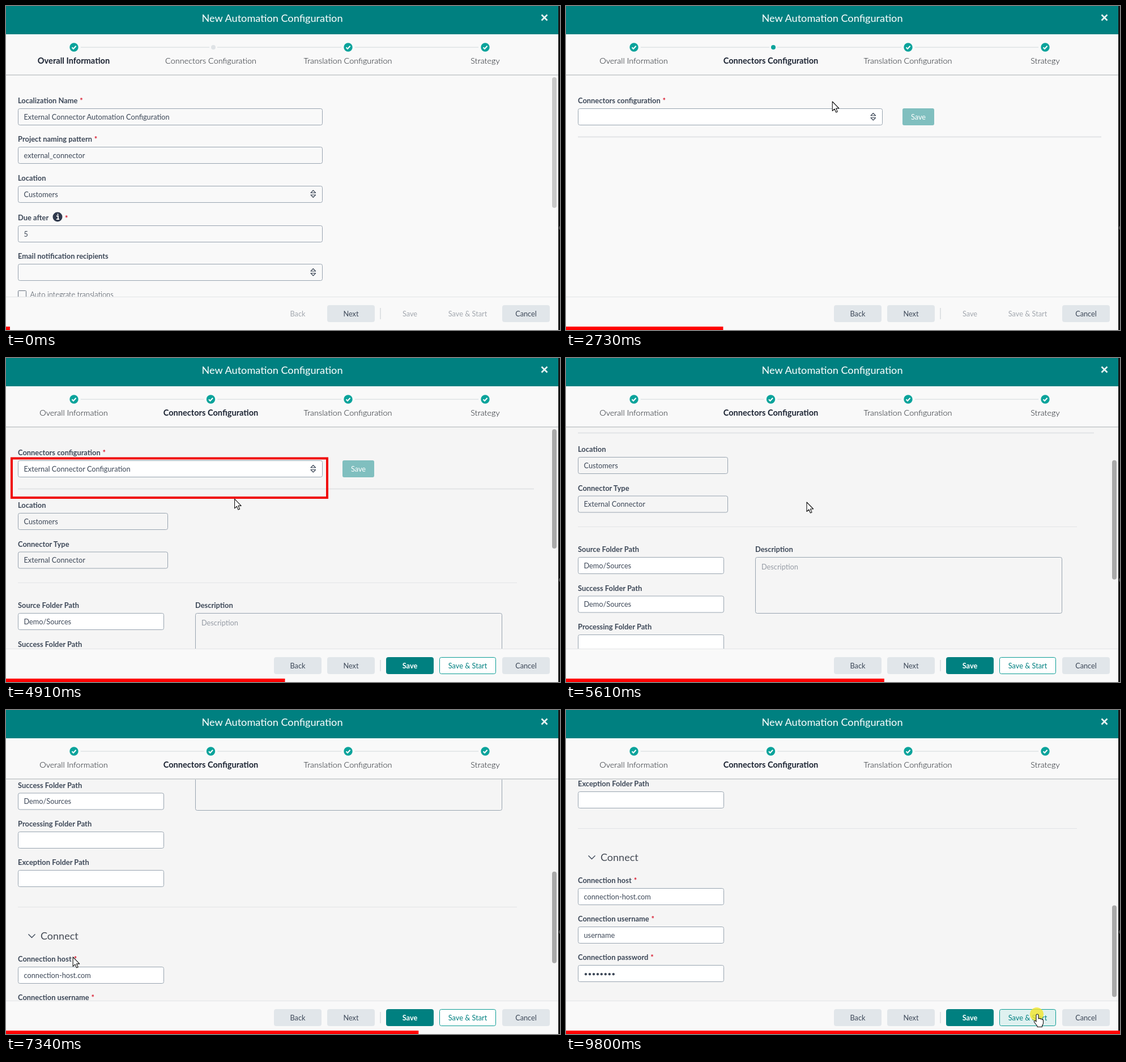
These frames come from a looping animation (978 by 573 pixels, 9870 ms). An HTML page:

```html
<!DOCTYPE html>
<html lang="en">
<head>
<meta charset="utf-8">
<title>New Automation Configuration</title>
<style>
  html, body { margin: 0; width: 100%; height: 100%; overflow: hidden; background: #f9f9f9; }
  svg { display: block; }
  text { font: 12.75px Lato, "Open Sans", sans-serif; fill: #3d4858; white-space: pre; }
  .title { font-size: 18.15px; fill: #fff; }
  .step { font-size: 14.45px; font-weight: 300; fill: #10151c; }
  .step.on { font-size: 14.6px; font-weight: 700; fill: #1c2433; }
  .label { font-size: 12.9px; font-weight: 700; }
  .star { fill: #d9182d; }
  .light { font-size: 12.9px; font-weight: 300; fill: #28323f; }
  .head { font-size: 18px; fill: #454b55; }
  .dots { font-size: 12px; }
  .hint { fill: #969ca5; }
  .box { fill: none; stroke: #98a4b0; }
  .white { fill: #fff; }
  .rule { stroke: #e2e4e6; }
  .icon { fill: none; stroke: #3d4858; stroke-width: 1.4; }
  .btn rect { fill: #e1e6ea; stroke: #e1e6ea; }
  .btn.off rect { fill: none; stroke: none; }
  .btn.off text { fill: #a3a8af; }
  .btn.main rect { fill: #008080; stroke: #008080; }
  .btn.main text { fill: #fff; font-weight: 700; }
  .btn.line rect { fill: #fff; stroke: #0a9c94; }
  .btn.line text { fill: #008080; }
  .btn.line.hover rect { fill: #dff1f0; }
</style>
</head>
<body>
<script>
const FRAME = 70, COUNT = 141, W = 978, H = 573;

const PAGE_AT = 2310, FOCUS_AT = 3080, MARK_AT = 3010, OPEN_AT = 3290,
      PICK_AT = 4340, LOAD_AT = 4550, UNMARK_AT = 5330, EXPAND_AT = 6930, HOVER_AT = 9520;

// Markup helpers; text is placed by its vertical middle.
const text = (x, y, s, cls = '', size = 13, anchor = 'start') =>
  `<text x="${x}" y="${y + size * .36}" class="${cls}" text-anchor="${anchor}">${s}</text>`;
const label = (x, y, s, need) =>
  text(x, y, s + (need ? '<tspan class="star" dx="4">*</tspan>' : ''), 'label');
const box = (x, y, w, h = 29, cls = '', id = '') =>
  `<rect id="${id}" class="box ${cls}" x="${x + .5}" y="${y + .5}" width="${w}" height="${h}" rx="3"/>`;
const field = (y, name, value, w, { need, cls = '', style = '' } = {}) =>
  label(21, y - 13.5, name, need) + box(21, y, w, 29, cls) + text(31.5, y + 15, value, style);
const rule = (y, right, width = 1, color = '#e2e4e6') =>
  `<path d="M21 ${y}H${right}" stroke="${color}" stroke-width="${width}"/>`;
const sorter = y => `<path class="icon" stroke-linejoin="round" style="stroke-width:1.15"
  d="M538 ${y - 2}L542.300 ${y - 6.5}L546.600 ${y - 2}ZM538 ${y + 1.500}H546.600L542.300 ${y + 6}Z"/>`;
const button = (id, x, w, s, cls = '') =>
  `<g id="${id}" class="btn ${cls}"><rect x="${x + .5}" y="529.5" width="${w - 1}" height="29" rx="3"/>` +
  text(x + w / 2, 544, s, '', 13, 'middle') + '</g>';
const check = x => `<g transform="translate(${x} 73)">
  <circle r="12" fill="#f9f9f9"/><circle r="7.7" fill="#0aa39b"/>
  <path d="M-3.500 .2L-1 2.700L3.600-2.300" fill="none" stroke="#fff" stroke-width="2"/></g>`;

const steps = [[119.5, 'Overall Information'], [361.5, 'Connectors Configuration'],
               [603.5, 'Translation Configuration'], [846, 'Strategy']];

const overall =
  field(181, 'Localization Name', 'External Connector Automation Configuration', 537, { need: true }) +
  field(249, 'Project naming pattern', 'external_connector', 537, { need: true }) +
  field(318, 'Location', 'Customers', 537) + sorter(332.5) +
  field(388, 'Due after', '5', 537) +
  `<circle cx="91" cy="373" r="8.5" fill="#2f394c"/>
   <path d="M89 371.500H92V377M89 377.200H94M90.500 368.500H92.500" fill="none" stroke="#fff" stroke-width="1.8"/>` +
  text(104, 375, '*', 'label star') +
  field(456, 'Email notification recipients', '', 537) + sorter(471) +
  '<rect x="21.5" y="503.5" width="14" height="14" rx="1" class="box" style="stroke:#66717e"/>' +
  text(42.5, 510, 'Auto integrate translations', 'light');

const white = { cls: 'white' }, needed = { cls: 'white', need: true };
const details =
  field(274, 'Location', 'Customers', 264) +
  field(342.5, 'Connector Type', 'External Connector', 264) +
  rule(397.5, 902) +
  field(451, 'Source Folder Path', 'Demo/Sources', 257, white) +
  label(334, 437.5, 'Description') + box(334, 451, 541, 99) + text(345, 468, 'Description', 'hint') +
  field(519.5, 'Success Folder Path', 'Demo/Sources', 257, white) +
  field(588, 'Processing Folder Path', '', 257, white) +
  field(656, 'Exception Folder Path', '', 257, white) +
  rule(721.5, 902) +
  '<path id="chevron" class="icon"/>' +
  text(61, 773, 'Connect', 'head', 18) +
  '<g id="account">' +
  field(827, 'Connection host', 'connection-host.com', 257, needed) +
  field(895, 'Connection username', 'username', 257, needed) +
  field(963, 'Connection password', '••••••••', 257, { ...needed, style: 'dots' }) +
  '</g>';

document.body.innerHTML = `<svg width="${W}" height="${H}" viewBox="0 0 ${W} ${H}">
  <defs>
    <clipPath id="view"><path d="M0 123H975V514H0Z"/></clipPath>
    <filter id="shade" x="-5%" y="-30%" width="110%" height="180%">
      <feDropShadow dx="0" dy="2" stdDeviation="1.8" flood-opacity=".35"/></filter>
  </defs>
  <rect width="${W}" height="${H}" fill="#f9f9f9"/>
  <rect width="975" height="50" fill="#008080"/>
  ${text(470, 21.5, 'New Automation Configuration', 'title', 18.2, 'middle')}
  <path d="M945.500 15.500L955.500 25.500M955.500 15.500L945.500 25.500" stroke="#e6f2f2" stroke-width="2.800"/>
  <path d="M120 73H846" stroke="#dfe3e6" stroke-width="1.500"/>
  ${check(120)}${check(604)}${check(846)}
  <g id="dot"><circle cx="366" cy="73" r="7" fill="#f9f9f9"/><circle id="dotFill" cx="366" cy="73" r="4"/></g>
  <g id="tick">${check(361.5)}</g>
  ${steps.map(([x, s]) => text(x, 97, s, 'step', 14.6, 'middle')).join('')}
  <g clip-path="url(#view)">
    <rect id="tint" y="123" width="975" height="391" fill="#f5f5f5"/>
    <g id="overall">${overall}</g>
    <g id="connectors">
      ${label(21, 167.5, 'Connectors configuration', true)}
      ${box(21, 181, 537, 29, 'white', 'picker')}${sorter(196)}
      <g id="picked">${text(31.5, 196, 'External Connector Configuration')}</g>
      <path id="caret" d="M32.500 188V204" stroke="#222"/>
      <rect x="594" y="181" width="56" height="30" rx="3" fill="#80bfbf"/>
      ${text(622, 196, '<tspan fill="#fff">Save</tspan>', '', 13, 'middle')}
      <g id="ruleWide">${rule(231.5, 945, 2)}</g><g id="ruleSlim">${rule(231.5, 932, 2)}</g>
      <g id="details">${details}</g>
      <g id="list"><rect x="21" y="211" width="537" height="30" fill="#e3f1f0" filter="url(#shade)"/>
        ${text(33, 225.5, 'External Connector Configuration')}</g>
    </g>
    <rect id="thumb" x="964" width="8" rx="4"/>
  </g>
  <path d="M0 122H975" stroke="#d0d3d5" stroke-width="2"/>
  <path d="M0 514.500H975" class="rule"/>
  ${button('back', 473, 84, 'Back')}${button('next', 567, 84, 'Next')}
  <path d="M661 534V554" stroke="#c6cbd0"/>
  ${button('save', 671, 84, 'Save')}${button('start', 765, 100, 'Save &amp; Start')}
  ${button('cancel', 876, 84, 'Cancel')}
  <rect id="mark" x="10" y="177.500" width="557" height="69.500" fill="none" stroke="#f00505" stroke-width="4"/>
  <rect x="975" width="3" height="${H}" fill="#151515"/>
  <path d="M978 389.500Q975.500 392.500 978 395.500" fill="none" stroke="#8a8a8a"/>
  <circle id="halo" r="12" fill="#f3e62c" opacity=".8"/>
  <g id="pointer" fill="#fff" stroke="#111" stroke-width="1.100" stroke-linejoin="round">
    <path id="arrow" d="M0 0V16.500L3.800 13L6.400 19L9 17.900L6.400 12H11.600Z"/>
    <path id="hand" d="M-2 2Q-2 0 0 0T2 2V8Q4 6.500 5.500 8.500Q7.500 7.500 8.500 9.500Q10.500 9 10.500 11.500V16Q10 19 8.500 20V22.500H0V21L-5 14.500Q-6.500 12-4.500 11.500T-2 13.500Z"/>
    <path id="beam" fill="none" d="M-3.500-7H-1L0-6L1-7H3.500M0-6V6M-3.500 7H-1L0 6L1 7H3.500"/>
  </g>
  <rect id="bar" y="567" height="6" fill="#f00"/>
</svg>`;

const $ = id => document.getElementById(id);
const show = (id, on) => $(id).setAttribute('display', on ? 'inline' : 'none');
const set = (id, attrs) => { for (const k in attrs) $(id).setAttribute(k, attrs[k]); };
const labels = document.querySelectorAll('.step');

// time, x, y, shape used from that time on
const path = [
  [0, 715, 580, ''], [630, 711, 566, 'arrow'], [770, 632, 562, 'arrow'], [910, 530, 525, 'arrow'],
  [1050, 497, 506, 'arrow'], [1190, 446, 455, 'arrow'], [1330, 355, 332, 'beam'], [1400, 336, 288, 'arrow'],
  [1470, 333, 266, 'beam'], [1540, 316, 230, 'arrow'], [1610, 316, 190, 'beam'], [1680, 319, 160, 'arrow'],
  [1750, 321, 137, 'arrow'], [2030, 350, 92, 'hand'], [2380, 350, 92, 'hand'], [2450, 352, 112, 'arrow'],
  [2940, 547, 206, 'hand'], [3780, 547, 206, 'hand'], [4130, 300, 222, 'hand'], [4480, 300, 222, 'arrow'],
  [5050, 425, 255, 'arrow'], [5960, 425, 255, 'arrow'], [6230, 155, 316, 'beam'], [6450, 155, 316, 'beam'],
  [6580, 120, 400, 'arrow'], [6720, 90, 470, 'hand'], [7000, 90, 470, 'arrow'], [7380, 124, 430, 'arrow'],
  [8400, 124, 430, 'arrow'], [9380, 806, 505, 'arrow'], [9520, 826, 531, 'hand'], [9660, 832, 538, 'hand'], [9870, 832, 538, 'hand']
];
const scrolls = [[0, 0], [5330, 0], [5540, 99], [5680, 99], [5820, 199], [5960, 199], [6170, 298],
                 [7070, 298], [7420, 414], [8090, 414], [8300, 512], [9870, 512]];
const clicks = [2170, 3010, 4270, 6860, 9730];

// Values at time t between keys; longer moves are eased.
function sample(keys, t) {
  let i = 0;
  while (i < keys.length - 2 && keys[i + 1][0] <= t) i++;
  const a = keys[i], b = keys[i + 1], span = b[0] - a[0];
  let u = Math.min(1, (t - a[0]) / span);
  if (span > 160) u = u * u * (3 - 2 * u);
  return a.map((v, k) => k && typeof v === 'number' ? v + (b[k] - v) * u : v);
}

function draw(t) {
  const n = Math.floor(t / FRAME);
  t = n * FRAME;
  const second = t >= PAGE_AT, loaded = t >= LOAD_AT, open = t >= EXPAND_AT;

  set('bar', { width: (n + 1) * W / COUNT });
  labels.forEach((el, i) => el.classList.toggle('on', i === +second));
  show('dot', !loaded);
  show('tick', loaded);
  set('dotFill', { fill: second ? '#0aa39b' : '#dfe3e6' });

  show('overall', !second);
  show('connectors', second);
  show('tint', loaded);
  show('details', loaded);
  show('ruleWide', !loaded);
  show('ruleSlim', loaded);
  show('picked', t >= PICK_AT);
  show('list', t >= OPEN_AT && t < PICK_AT);
  show('caret', t >= FOCUS_AT && t < PICK_AT && (t - 3150 + 1060) % 1060 < 570);
  $('picker').style.stroke = t >= FOCUS_AT && !loaded ? '#0a9c94' : '';
  show('mark', t >= MARK_AT && t < UNMARK_AT);
  show('account', open);
  set('chevron', { d: open ? 'M39.500 769.500L45.500 775.500L51.500 769.500' : 'M42.500 766.500L48.500 772.500L42.500 778.500' });

  const top = Math.round(sample(scrolls, t)[1]);
  set('connectors', { transform: `translate(0 ${-top})` });
  show('thumb', !second || loaded);
  set('thumb', {
    y: 126 + top * (open ? .4285 : .553),
    height: open ? 162 : loaded ? 211 : 231,
    fill: loaded ? '#a9a9a9' : '#c8c8c8'
  });

  $('back').classList.toggle('off', !second);
  $('save').setAttribute('class', 'btn ' + (loaded ? 'main' : 'off'));
  $('start').setAttribute('class', 'btn ' + (loaded ? 'line' : 'off') + (t >= HOVER_AT ? ' hover' : ''));

  const [, x, y, shape] = sample(path, t);
  set('pointer', { transform: `translate(${x} ${y})` });
  set('halo', { cx: x - 1, cy: y });
  for (const s of ['arrow', 'hand', 'beam']) show(s, s === shape);
  show('halo', clicks.some(c => t >= c && t < c + 140));
}

const begin = performance.now();
function tick() {
  draw((performance.now() - begin) % (FRAME * COUNT));
  requestAnimationFrame(tick);
}
tick();
</script>
</body>
</html>
```
